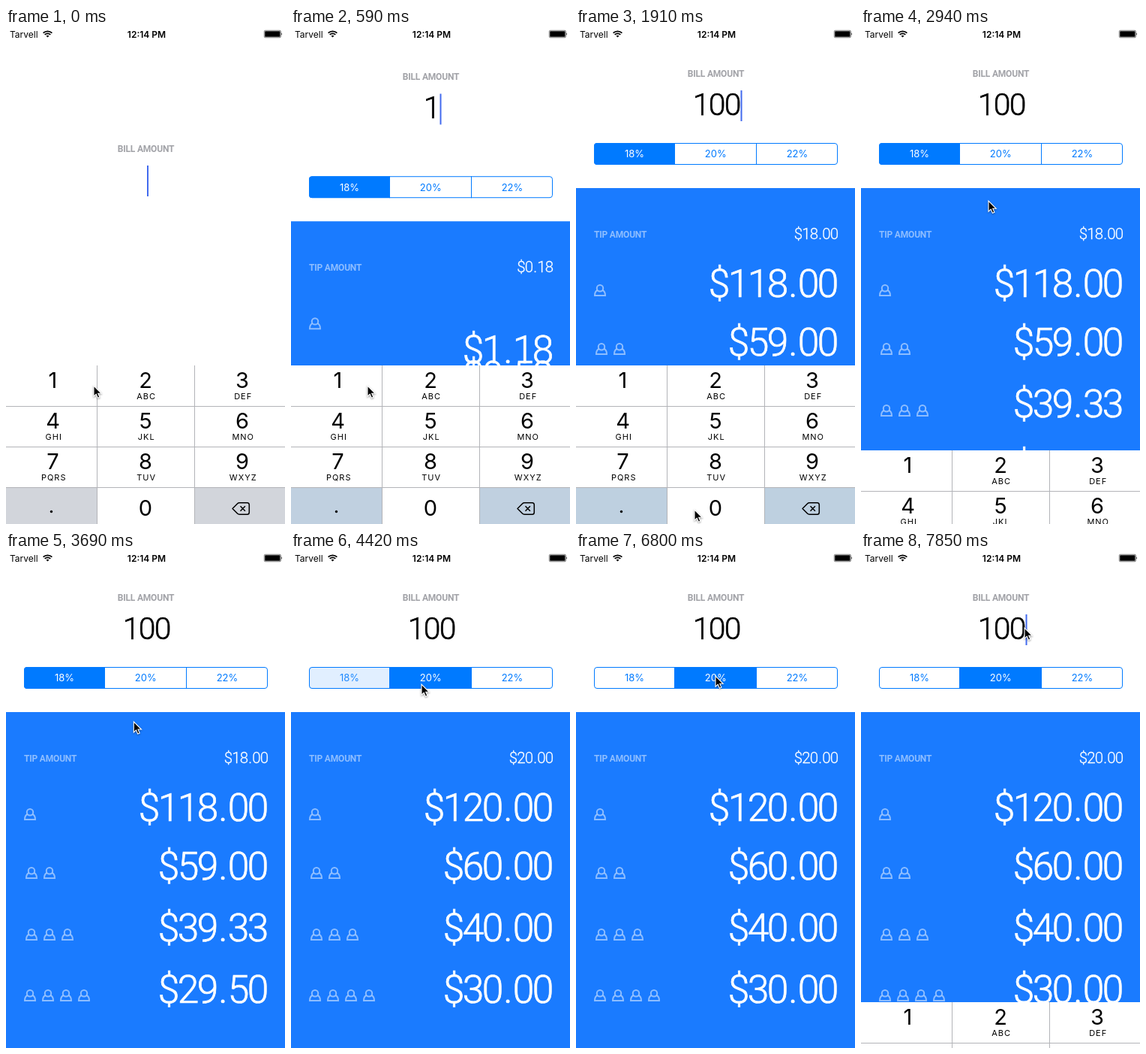
These frames come from a looping animation (372x660 px, 8 s). An HTML page:

```html
<!DOCTYPE html>
<html lang="en">
<head>
<meta charset="utf-8">
<title>Tip calculator</title>
<style>
  html, body { margin: 0; width: 100%; height: 100%; overflow: hidden; background: #fff; }
  svg { display: block; width: 372px; height: 660px; font-family: Inter, "Liberation Sans", sans-serif; }
  .mid, .num { text-anchor: middle; }
  .num { font-family: Roboto, "Open Sans", sans-serif; font-weight: 300; stroke-width: .014em; }
  .cap { font: 700 12px Roboto, "Open Sans", sans-serif; letter-spacing: -.2px; }
  .abc { font-size: 11px; letter-spacing: 1px; }
  .white { fill: #fff; stroke: #fff; }
</style>
</head>
<body>
<svg viewBox="0 0 372 660">
  <defs>
    <clipPath id="round"><rect x="24" y="153" width="325" height="29" rx="4"/></clipPath>
    <g id="person" fill="none" stroke="#fff" stroke-opacity=".5" stroke-width="2">
      <circle cx="8" cy="5.2" r="4.2"/>
      <path d="M4.3 8.2C2 9 1 11 1 15H15C15 11 14 9 11.7 8.2"/>
    </g>
  </defs>

  <g font-size="12">
    <text x="5" y="12.5">Tarvell</text>
    <text x="187.5" y="12.5" class="mid" font-weight="600">12:14 PM</text>
    <path d="M49.6 6.7a8.4 8.4 0 0 1 11.8 0M51.7 8.9a5.4 5.4 0 0 1 7.6 0" fill="none" stroke="#000" stroke-width="1.7"/>
    <path d="M55.5 12.6l-2-2a2.9 2.9 0 0 1 4 0z"/>
    <rect x="344.25" y="3.25" width="22.2" height="9.5" rx="1.5" fill="none" stroke="#000" stroke-width=".5"/>
    <rect x="345.2" y="4.2" width="20.3" height="7.6" rx=".6"/>
    <path d="M367.4 6.3q1.6 1.7 0 3.4z"/>
  </g>

  <g id="bill">
    <text x="186.5" y="64.5" class="cap mid" fill="#a2a3a8">BILL AMOUNT</text>
    <text id="amount" y="115.7" class="num" font-size="41" stroke="#000"/>
    <rect id="caret" y="83" width="2" height="41" fill="#426bee"/>
  </g>

  <g id="panel">
    <g id="tabs" font-size="13" clip-path="url(#round)"></g>
    <rect x="24.5" y="153.5" width="324" height="28" rx="3.5" fill="none" stroke="#007aff"/>
    <path d="M131.5 153v29M240.5 153v29" stroke="#007aff"/>
    <rect y="213" width="372" height="1000" fill="#1a7bff"/>
    <text x="24" y="278.5" class="cap" fill="#fff" fill-opacity=".5">TIP AMOUNT</text>
    <text id="tip" y="281" class="num white" font-size="20.5"/>
    <g id="rows" font-size="51.5"></g>
  </g>

  <g id="pad"></g>

  <path id="mouse" d="M0 0V14.2L3.2 11.2 5.4 16.3 7.9 15.2 5.7 10.3H10.2Z" stroke="#fff" stroke-width="1.1"
    style="filter:drop-shadow(0 1px 1px #0006)"/>
</svg>

<script>
const LOOP = 8000;
const $ = id => document.getElementById(id);
const clamp = v => Math.min(1, Math.max(0, v));
const span = (t, start, length) => clamp((t - start) / length);
const rest = (t, start, length) => (1 - span(t, start, length)) ** 3;   // ease-out, 1 down to 0
const shift = (el, x, y) => el.setAttribute('transform', `translate(${x} ${y})`);

// [time, value]
const typed = [[0, ''], [220, '1'], [1310, '10'], [1750, '100']];
const picks = [[-1000, 0], [4200, 1], [5485, 2], [6550, 1]];
const presses = [[220, 400, 1], [1310, 1460, 0], [1750, 1900, 0]];
const rates = [18, 20, 22];

// [time, x, y]
const track = [
  [140, 117, 476], [220, 102, 476], [600, 102, 476], [1170, 158, 641], [2060, 158, 641],
  [2700, 170, 230], [3600, 170, 230], [4130, 174, 176], [4750, 174, 176], [5400, 265, 173],
  [5620, 265, 173], [6210, 186, 165], [7000, 186, 165], [7550, 218, 101]
];

// Tabs
const edges = [24, 131.5, 240.5, 349];
$('tabs').innerHTML = rates.map((rate, i) =>
  `<rect x="${edges[i]}" y="153" width="${edges[i + 1] - edges[i]}" height="29" fill="#007aff"/>
   <text x="${[78, 186.3, 295][i]}" y="172.3" class="mid">${rate}%</text>`).join('');
const tabFills = [...$('tabs').querySelectorAll('rect')];
const tabTexts = [...$('tabs').querySelectorAll('text')];

// Split rows: baseline, icon left, icon top
$('rows').innerHTML = [[358, 24, 341], [435.5, 26, 419], [517.5, 26, 501], [599.5, 24, 582]].map(([base, x, y], i) =>
  Array.from({ length: i + 1 }, (_, n) => `<use href="#person" x="${x + 24 * n}" y="${y}"/>`).join('') +
  `<text y="${base}" class="num white"/>`).join('');
const shares = [...$('rows').querySelectorAll('text')];

// Keypad
const letters = ['', '', 'ABC', 'DEF', 'GHI', 'JKL', 'MNO', 'PQRS', 'TUV', 'WXYZ'];
const columns = [[0, 122, 62.5], [122, 130, 186], [252, 120, 315]];
const key = (n, col, row) => {
  const [x, w, mid] = columns[col], y = 449 + 54 * row;
  return `<rect id="key${n}" x="${x}" y="${y}" width="${w}" height="54"/>
    <text x="${mid}" y="${n ? y + 30 : 648.5}" class="mid" fill="#000" font-size="29">${n}</text>
    <text x="${mid + 1.2}" y="${y + 45}" class="mid abc" fill="#000">${letters[n]}</text>`;
};
$('pad').innerHTML = `<g fill="#fff">${
    Array.from({ length: 9 }, (_, i) => key(i + 1, i % 3, Math.floor(i / 3))).join('')}${key(0, 1, 3)}</g>
  <path id="shade" d="M0 611H122V660H0ZM252 611H372V660H252Z"/>
  <path d="M121.5 449V660M251.5 449V660M0 503.5H372M0 557.5H372M0 611.5H372" stroke="#b3b4b8"/>
  <circle cx="60.5" cy="643.5" r="1.7"/>
  <path d="M302 639.5L308.5 633Q309.7 631.8 311.4 631.8H321.5Q324.3 631.8 324.3 634.6V644.4Q324.3 647.2 321.5 647.2H311.4Q309.7 647.2 308.5 646ZM312.5 636.3l6.4 6.4M318.9 636.3l-6.4 6.4"
    fill="none" stroke="#000" stroke-width="1.5" stroke-linejoin="round"/>`;

// Lays characters in equal cells that finish at the right edge
function setCells(el, text, right, cell, dot) {
  const xs = [];
  for (const c of [...text].reverse()) {
    const w = c === '.' ? dot : cell;
    xs.unshift(right - w / 2);
    right -= w;
  }
  el.setAttribute('x', xs.join(' '));
  el.textContent = text;
}

const latest = (list, t) => list.findLastIndex(([start]) => t >= start);
const money = v => '$' + (Math.round(v * 100 + 1e-6) / 100).toFixed(2);

function mouseAt(t) {
  const i = track.findIndex(([time]) => time > t);
  if (i < 0) return track.at(-1).slice(1);
  if (i === 0) return track[0].slice(1);
  const [t0, x0, y0] = track[i - 1], [t1, x1, y1] = track[i];
  const k = span(t, t0, t1 - t0), e = k * k * (3 - 2 * k);
  return [x0 + (x1 - x0) * e, y0 + (y1 - y0) * e];
}

let shown = '';
function showValues(text, rate) {
  if (shown === text + rate) return;
  shown = text + rate;
  const bill = Number(text), tip = bill * rate / 100;
  setCells($('amount'), text, 188 + text.length * 10.5, 21, 12);
  $('caret').setAttribute('x', 188 + text.length * 10.5);
  setCells($('tip'), money(tip), 349.7, 10.5, 6);
  shares.forEach((el, i) => setCells(el, money((bill + tip) / (i + 1)), 349, 26, 15));
}

function draw(t) {
  const pick = latest(picks, t), [since, current] = picks[pick];
  const previous = pick ? picks[pick - 1][1] : -1;
  showValues(typed[latest(typed, t)][1], rates[current]);

  rates.forEach((_, i) => {
    const k = i === current ? span(t, since, 220) : i === previous ? 1 - span(t, since, 250) : 0;
    tabFills[i].setAttribute('fill-opacity', k);
    tabTexts[i].setAttribute('fill', `rgb(${255 * k},${122 + 133 * k},255)`);
  });

  const below = rest(t, 290, 560);
  shift($('bill'), 0, 100 * rest(t, 230, 560));
  shift($('panel'), 0, 447 * below);
  shift(shares[0], 0, 447 * below);

  const hidden = t < 7808 ? 1 - rest(t, 2853, 390) : rest(t, 7808, 400);
  shift($('pad'), 0, 211 * hidden);
  $('caret').style.display = t >= 2853 && t < 7808 ? 'none' : '';
  $('shade').setAttribute('fill', `rgb(${190 + 20 * below},${208 + 5 * below},${224 - 5 * below})`);
  for (const n of [0, 1]) {
    const down = presses.some(([from, to, k]) => k === n && t >= from && t < to);
    $('key' + n).setAttribute('fill', down ? '#d2d5db' : '#fff');
  }

  shift($('mouse'), ...mouseAt(t));
}

function tick() {
  draw(performance.now() % LOOP);
  requestAnimationFrame(tick);
}
tick();
</script>
</body>
</html>
```
